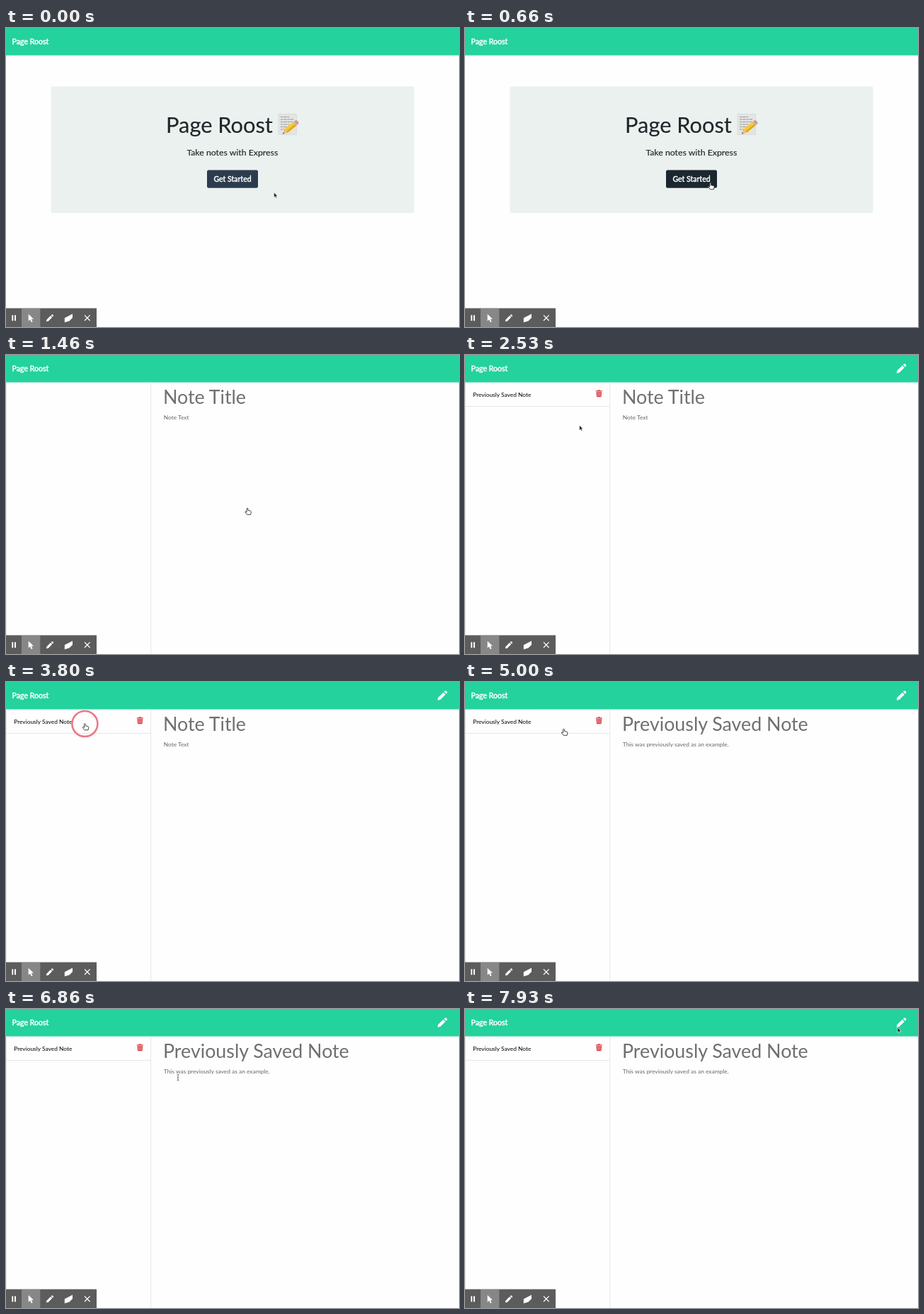
Write an HTML page that moves like this. It is 640x422 px and loops after 8 s.

```html
<!DOCTYPE html>
<html lang="en">
<head>
<meta charset="utf-8">
<title>Page Roost</title>
<style>
html, body { margin: 0; width: 100%; height: 100%; overflow: hidden; background: #fefefe; }
svg { display: block; width: 640px; height: 422px; font-family: Lato, sans-serif; }
.bold { fill: #fff; stroke: #fff; stroke-width: .45; font-size: 10.55px; }
.dark { fill: #212529; stroke: #212529; stroke-width: .15; }
.mid { text-anchor: middle; }
.big { font-size: 26.8px; fill: #6f706f; }
.small { font-size: 8.4px; }
.rule { stroke: #e6e8e8; fill: none; }
</style>
</head>
<body>
<svg viewBox="0 0 640 422">
  <defs>
    <path id="arrow" d="M0 0V7.2L1.7 5.8 2.8 8.2 4.1 7.6 3 5.3H5.2Z" fill="#222" stroke="#fff" stroke-width=".6"/>
    <path id="hand" d="M-.9 .8Q0-.6 .9 .8V3.4L4.6 4.2Q5.5 4.6 5.3 5.8L4.6 9.3H-.3L-3 5.9Q-3.2 4.6-2 4.9L-.9 5.8Z" fill="#fff" stroke="#333" stroke-width=".9"/>
    <path id="beam" d="M-1.5 .3Q0 .3 0 1.3V7.9Q0 8.9-1.5 8.9M1.5 .3Q0 .3 0 1.3M0 7.9Q0 8.9 1.5 8.9M-.8 5H.8" fill="none" stroke="#555" stroke-width=".8"/>
    <path id="pencil" d="M0 13.5L.8 9.9 8.2 2.5 11.2 5.5 3.8 12.9ZM9.2 1.6L10.3.5Q11.3-.4 12.3.5L13.3 1.5Q14.2 2.5 13.3 3.5L12.2 4.6Z" fill="#fff"/>
  </defs>

  <rect width="640" height="422" fill="#fefefe"/>
  <path d="M0 39H640" stroke="#dcebe6"/>
  <rect width="640" height="38.5" fill="#24d29d"/>
  <text class="bold" x="8.6" y="23.2">Page Roost</text>

  <g id="home">
    <rect x="63.5" y="82.5" width="513" height="178.5" rx="2" fill="#ebf1ef"/>
    <text class="dark mid" x="301.5" y="148" font-size="30.8">Page Roost</text>
    <g id="memo">
      <path d="M385 121.5H410.5V150.5H385Z" fill="#e4e5e2" stroke="#d0d3d0" stroke-width=".6"/>
      <path d="M388 125.5H400M388 129H407M388 132.5H405M388 136H401M388 139.5H398M388 143H394" stroke="#949795" stroke-dasharray="3 .7 5 .8"/>
      <g transform="rotate(6 391 149) scale(.96) translate(16.3 6.2)">
        <path d="M391 149.5L393 142 398 147Z" fill="#e5bd8a"/>
        <path d="M391 149.5L391.8 147.2 393.2 148.8Z" fill="#333"/>
        <path d="M393 142L404.5 130.5 409.5 135.5 398 147Z" fill="#f6ca2f"/>
        <path d="M396 145L407.5 133.5 409.5 135.5 398 147Z" fill="#dfa81f"/>
        <path d="M404.5 130.5L406.1 128.9 411.1 133.9 409.5 135.5Z" fill="#b5b8b8"/>
        <path d="M406.1 128.9L407.4 127.8Q409.7 127 411.6 129.1 413.2 131.2 412.2 132.8L411.1 133.9Z" fill="#e58b86"/>
      </g>
    </g>
    <text class="dark mid" x="319.8" y="180" font-size="12.3">Take notes with Express</text>
    <rect id="focus" x="282.5" y="199" width="75" height="28.2" rx="3.5" fill="#8797a2"/>
    <rect id="button" x="284" y="200.6" width="72" height="25.1" rx="2.2"/>
    <text class="bold mid" x="320" y="217">Get Started</text>
  </g>

  <g id="notes">
    <path class="rule" d="M.5 39V422M204.7 39V422"/>
    <g id="list">
      <path class="rule" d="M0 72.5H205"/>
      <text class="small" x="11.2" y="59">Previously Saved Note</text>
      <path d="M184.8 50.2H187.4L188 49.3H190.6L191.2 50.2H193.8V51.5H184.8ZM185.4 52.2H193.2L192.7 58.2Q192.6 59.3 191.6 59.3H187Q186 59.3 185.9 58.2Z" fill="#d8414a"/>
      <path d="M187.3 53.4V58M189.3 53.4V58M191.3 53.4V58" stroke="#f6c9cb" stroke-width=".7"/>
      <use href="#pencil" x="609.7" y="12.2"/>
    </g>
    <text id="title" class="big" x="222" y="69.3"/>
    <text id="body" class="small" x="222.8" y="90.8" fill="#666"/>
  </g>

  <circle id="ring" cx="111.4" cy="59" r="18" fill="none" stroke="#ec7887" stroke-width="2.6"/>

  <g id="toolbar">
    <rect y="395.5" width="128" height="26.5" fill="#5c5c5c"/>
    <rect x="22" y="396" width="26.3" height="26" fill="#878787"/>
    <path d="M9.3 405.2V413.2M13 405.2V413.2" stroke="#fff" stroke-width="1.9"/>
    <path d="M31.7 403.8V413.4L34.1 411.4 35.8 415.2 37.6 414.4 35.9 410.7H39Z" fill="#fff"/>
    <use href="#pencil" transform="translate(56.8 404.2) scale(.75)"/>
    <path d="M82.8 409.2L94 403.6V409L89.5 413.4 82.8 415.4Z" fill="#fff"/>
    <path d="M111 405.4L118.6 413M118.6 405.4L111 413" stroke="#fff" stroke-width="1.3"/>
  </g>
  <use id="cursor"/>
</svg>
<script>
const LOOP = 8000;
const CLICK = 1270, PAGE = 1460, LIST = 1530, PICK = 3800, LOADED = 3930, RING_END = 4270;
// time, x, y of the pointer's hot spot
const path = [
  [60, 378.5, 232], [860, 341, 216], [1530, 341, 216], [1800, 341, 209],
  [2660, 150, 92], [3200, 111.4, 58.5], [3930, 111.4, 58.5], [4600, 126, 62],
  [5000, 139.5, 66], [5460, 213, 85], [6330, 240, 91], [6860, 243, 92],
  [7200, 270, 98], [7930, 611, 26]
];
const $ = id => document.getElementById(id);
const show = (id, on) => $(id).style.display = on ? '' : 'none';
const write = (id, text) => { if ($(id).textContent !== text) $(id).textContent = text; };

function pointer(t) {
  const i = path.findIndex(p => p[0] > t);
  if (i === 0) return path[0].slice(1);
  if (i < 0) return path[path.length - 1].slice(1);
  const [t0, x0, y0] = path[i - 1], [t1, x1, y1] = path[i];
  const u = (t - t0) / (t1 - t0), k = u * u * (3 - 2 * u);
  return [x0 + (x1 - x0) * k, y0 + (y1 - y0) * k];
}

function shape(t, x, y) {
  if (t < LIST) return x < 356 && y < 226 ? 'hand' : 'arrow';
  if (x > 222 && y > 42) return 'beam';
  return x < 204 && y > 39 && y < 72 ? 'hand' : 'arrow';
}

function draw(t) {
  const [x, y] = pointer(t), kind = shape(t, x, y), loaded = t >= LOADED;
  show('home', t < PAGE);
  show('notes', t >= PAGE);
  show('list', t >= LIST);
  show('focus', t >= CLICK);
  $('button').setAttribute('fill', kind === 'hand' ? '#1a272f' : '#2c3c4e');
  write('title', loaded ? 'Previously Saved Note' : 'Note Title');
  write('body', loaded ? 'This was previously saved as an example.' : 'Note Text');
  show('ring', t >= PICK && t < RING_END);
  $('ring').setAttribute('opacity', Math.min(1, (RING_END - t) / 270));
  $('cursor').setAttribute('href', '#' + kind);
  $('cursor').setAttribute('transform', `translate(${x} ${y})`);
}

const start = performance.now();
function tick() {
  draw((performance.now() - start) % LOOP);
  requestAnimationFrame(tick);
}
tick();
</script>
</body>
</html>
```
